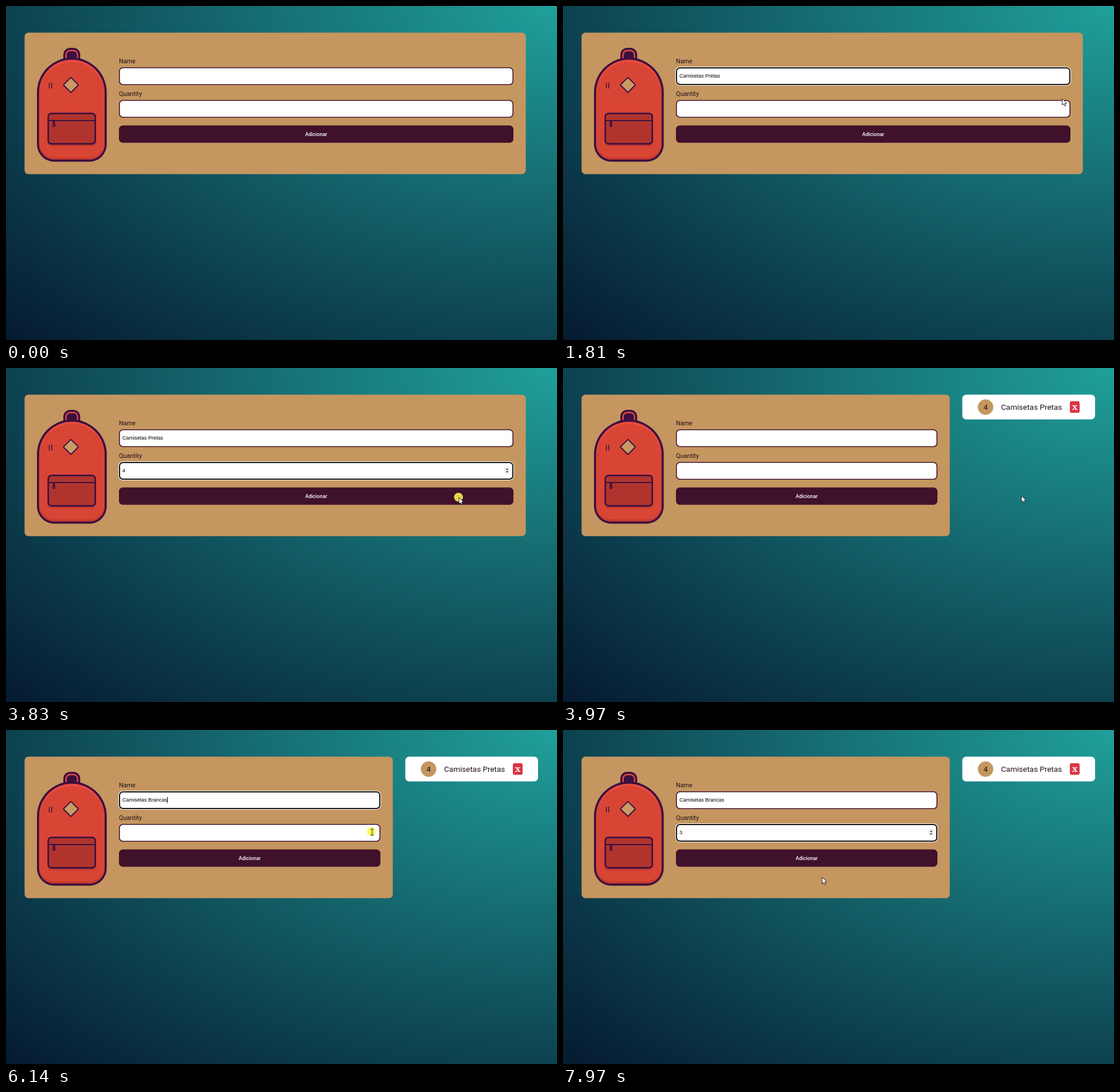
An HTML page with a canvas for the animation above (8000 ms loop, 961 px wide and 583 px high).

```html
<!DOCTYPE html>
<html lang="pt">
<head>
<meta charset="utf-8">
<title>Packing list</title>
<style>
html, body { margin: 0; width: 100%; height: 100%; overflow: hidden; background: #051a30; }
canvas { display: block; }
</style>
</head>
<body>
<canvas id="stage" width="961" height="583"></canvas>
<script>
const W = 961, H = 583, LOOP = 8000, BLINK = 530;
const ctx = document.getElementById('stage').getContext('2d');
const TAN = '#c5965f', WINE = '#3f112b', PURPLE = '#3c0f40', INK = '#20101c', RED = '#b0342d';
const ROBOTO = 'Roboto, sans-serif', ARIAL = '"Liberation Sans", Arial, sans-serif';
const NAME_Y = 107, QTY_Y = 164, FIELD_X = 197, FIELD_H = 31;

// The story: where the pointer goes, what it clicks, what is typed.
const OFF = W + 8;
const moves = [
  { from: 500, to: 930, x: 751, y: 117 },
  { from: 1040, to: 1330, x: OFF, y: 140 },
  { from: 1600, to: 2020, x: 774, y: 183 },
  { from: 3340, to: 3680, x: 790, y: 226 },
  { from: 3950, to: 4100, x: OFF, y: 170 },
  { from: 5030, to: 5390, x: 559, y: 130 },
  { from: 5730, to: 5940, x: 638, y: 178 },
  { from: 6930, to: 7225, x: OFF, y: 194 },
  { from: 7440, to: 7960, x: 452, y: 257 }
];
const clicks = [
  { at: 930, focus: 'name' },
  { at: 2150, focus: 'qty' },
  { at: 3850, focus: '' },
  { at: 5400, focus: 'name' },
  { at: 6170, focus: 'qty' }
];
const ADDED = clicks[2].at;
const entries = [
  { field: 'name', text: 'Camisetas Pretas', from: 1040, to: 1240 },
  { field: 'qty', text: '4', from: 3210, to: 3220 },
  { field: 'name', text: 'Camisetas Brancas', from: 5700, to: 5940 },
  { field: 'qty', text: '3', from: 6930, to: 6940 }
];

const clamp = k => Math.max(0, Math.min(1, k));
const progress = (t, span) => clamp((t - span.from) / (span.to - span.from));
const ease = k => k * k * (3 - 2 * k);

function pointerAt(t) {
  let x = OFF, y = 152;
  for (const m of moves) {
    const k = ease(progress(t, m));
    x += (m.x - x) * k;
    y += (m.y - y) * k;
  }
  return [x, y];
}

function stateAt(t) {
  const added = t >= ADDED;
  const s = { added, focus: '', name: '', qty: '', right: added ? 653 : 885 };
  let last = 0;
  for (const c of clicks) {
    if (t >= c.at) { s.focus = c.focus; last = c.at; }
  }
  for (const e of entries) {
    if (t < e.from || (e.from >= ADDED) !== added) continue;
    s[e.field] = e.text.slice(0, Math.round(e.text.length * progress(t, e)));
    last = Math.max(last, Math.min(t, e.to));
  }
  s.caret = Math.floor((t - last) / BLINK) % 2 === 0;
  s.pressed = clicks.some(c => t >= c.at - 30 && t < c.at + 110);
  return s;
}

function box(x, y, w, h, r, fill, edge = 0, color = '') {
  ctx.beginPath();
  ctx.roundRect(x, y, w, h, r);
  ctx.fillStyle = edge ? color : fill;
  ctx.fill();
  if (edge) box(x + edge, y + edge, w - 2 * edge, h - 2 * edge, [r].flat().map(v => Math.max(0, v - edge)), fill);
}

function line(x1, y1, x2, y2, color, width) {
  ctx.beginPath();
  ctx.moveTo(x1, y1);
  ctx.lineTo(x2, y2);
  ctx.strokeStyle = color;
  ctx.lineWidth = width;
  ctx.stroke();
}

function disc(x, y, r, fill) {
  ctx.beginPath();
  ctx.arc(x, y, r, 0, 2 * Math.PI);
  ctx.fillStyle = fill;
  ctx.fill();
}

function text(str, x, y, font, color, align = 'left') {
  ctx.font = font;
  ctx.fillStyle = color;
  ctx.textAlign = align;
  ctx.fillText(str, x, y);
}

function background() {
  ctx.save();
  ctx.translate(W, 0);
  ctx.scale(W * Math.SQRT2, H * Math.SQRT2);
  const g = ctx.createRadialGradient(0, 0, 0, 0, 0, 1);
  g.addColorStop(0, '#20a09b');
  g.addColorStop(1, '#051a30');
  ctx.fillStyle = g;
  ctx.fillRect(-1, 0, 1, 1);
  ctx.restore();
}

function backpack() {
  box(100, 73, 29.4, 32, [12, 12, 0, 0], '#e04a3e', 3.5, PURPLE);
  box(106, 79, 17.6, 24, [6, 6, 0, 0], PURPLE);

  const edge = 3.7, round = [61, 61, 30.4, 30.4], inner = round.map(r => r - edge);
  const x = 54 + edge, y = 90 + edge, w = 121.7 - 2 * edge, h = 181.8 - 2 * edge;
  box(54, 90, 121.7, 181.8, round, '#e94b40', edge, PURPLE);
  ctx.save();
  ctx.beginPath();
  ctx.roundRect(x, y, w, h, inner);
  ctx.clip();
  ctx.fillStyle = '#c5392f';
  ctx.fillRect(x, 200, w, h);
  box(x, y + 4, w, h - 7.5, inner, '#d84535');
  ctx.restore();

  for (const eye of [75.6, 79.8]) line(eye, 134, eye, 144, PURPLE, 1.5);

  ctx.save();
  ctx.translate(113.2, 137.8);
  ctx.rotate(Math.PI / 4);
  box(-10.3, -10.3, 20.6, 20.6, 2, '#c99a62', 2, PURPLE);
  ctx.restore();

  box(72.5, 190, 85, 55, 7, '#c03a30');
  box(72.4, 186.3, 84.6, 55.6, 7, RED, 2.6, PURPLE);
  line(74, 200, 156, 200, PURPLE, 2);
  line(83.6, 200, 83.6, 208, PURPLE, 3.6);
  disc(83.6, 208.6, 2.7, PURPLE);
  disc(83.6, 208.6, 1, RED);
}

function field(y, value, right, focused, caret) {
  const w = right - FIELD_X;
  if (focused) box(FIELD_X - 1, y - 1, w + 2, FIELD_H + 2, 8, '#ffffff');
  box(FIELD_X, y, w, FIELD_H, 7, '#ffffff', focused ? 2 : 1.6, focused ? '#101010' : WINE);
  text(value, 203, y + 18.4, '9px ' + ARIAL, '#000000');
  if (focused && caret) {
    ctx.fillStyle = '#000000';
    ctx.fillRect(Math.round(203 + ctx.measureText(value).width), y + 10, 1, 10.5);
  }
}

function spinner(x, y) {
  box(x - 4.5, y - 6, 9, 12, 1, '#efefef');
  ctx.fillStyle = '#404040';
  for (const dir of [-1, 1]) {
    ctx.beginPath();
    ctx.moveTo(x - 2.6, y + dir * 1.2);
    ctx.lineTo(x, y + dir * 3.8);
    ctx.lineTo(x + 2.6, y + dir * 1.2);
    ctx.fill();
  }
}

function card({ right, focus, caret, name, qty }) {
  box(32.4, 46.6, right + 21.6 - 32.4, 247, 6.75, TAN);
  backpack();
  text('Name', FIELD_X, NAME_Y - 7, '10.8px ' + ROBOTO, INK);
  text('Quantity', FIELD_X, QTY_Y - 7, '10.8px ' + ROBOTO, INK);
  field(NAME_Y, name, right, focus === 'name', caret);
  field(QTY_Y, qty, right, focus === 'qty', caret);
  if (focus === 'qty') spinner(right - 11, 179);
  box(FIELD_X, 208.4, right - FIELD_X, 30.4, 6.75, WINE);
  text('Adicionar', (FIELD_X + right) / 2, 227, '500 9px ' + ROBOTO, '#ffffff', 'center');
}

function item() {
  box(696.4, 46.6, 231.6, 43.2, 6.75, '#ffffff');
  disc(737, 68.2, 13.5, TAN);
  text('4', 737, 73, '13.5px ' + ROBOTO, INK, 'center');
  text('Camisetas Pretas', 764, 73, '13.5px ' + ROBOTO, INK);
  box(884, 58, 17, 20.3, 3, '#dc3545');
  text('x', 892.5, 73, '900 15px "Noto Serif", serif', '#ffffff', 'center');
}

function arrow(x, y) {
  ctx.save();
  ctx.translate(x, y);
  const path = new Path2D('M0 0V11.3L2.6 9 4.3 12.9 6.2 12.1 4.5 8.3 8 8Z');
  ctx.fillStyle = '#ffffff';
  ctx.fill(path);
  ctx.lineJoin = 'round';
  ctx.strokeStyle = '#101010';
  ctx.lineWidth = .9;
  ctx.stroke(path);
  ctx.restore();
}

function beam(x, y) {
  x = Math.floor(x) + .5;
  line(x, y - 5, x, y + 5.5, '#303030', 1);
  for (const end of [y - 5, y + 5.5]) line(x - 3, end, x + 3, end, '#303030', 1);
}

function pointer(t, { right, pressed }) {
  const [x, y] = pointerAt(t);
  if (x >= W) return;
  if (pressed) disc(x - .8, y - .5, 7.8, 'rgba(255, 250, 70, .85)');
  const inField = [NAME_Y, QTY_Y].some(top => y > top && y < top + FIELD_H);
  (inField && x > FIELD_X && x < right ? beam : arrow)(x, y);
}

function draw(t) {
  const s = stateAt(t);
  background();
  card(s);
  if (s.added) item();
  pointer(t, s);
}

const start = performance.now();
function tick() {
  draw((performance.now() - start) % LOOP);
  requestAnimationFrame(tick);
}
tick();
</script>
</body>
</html>
```
